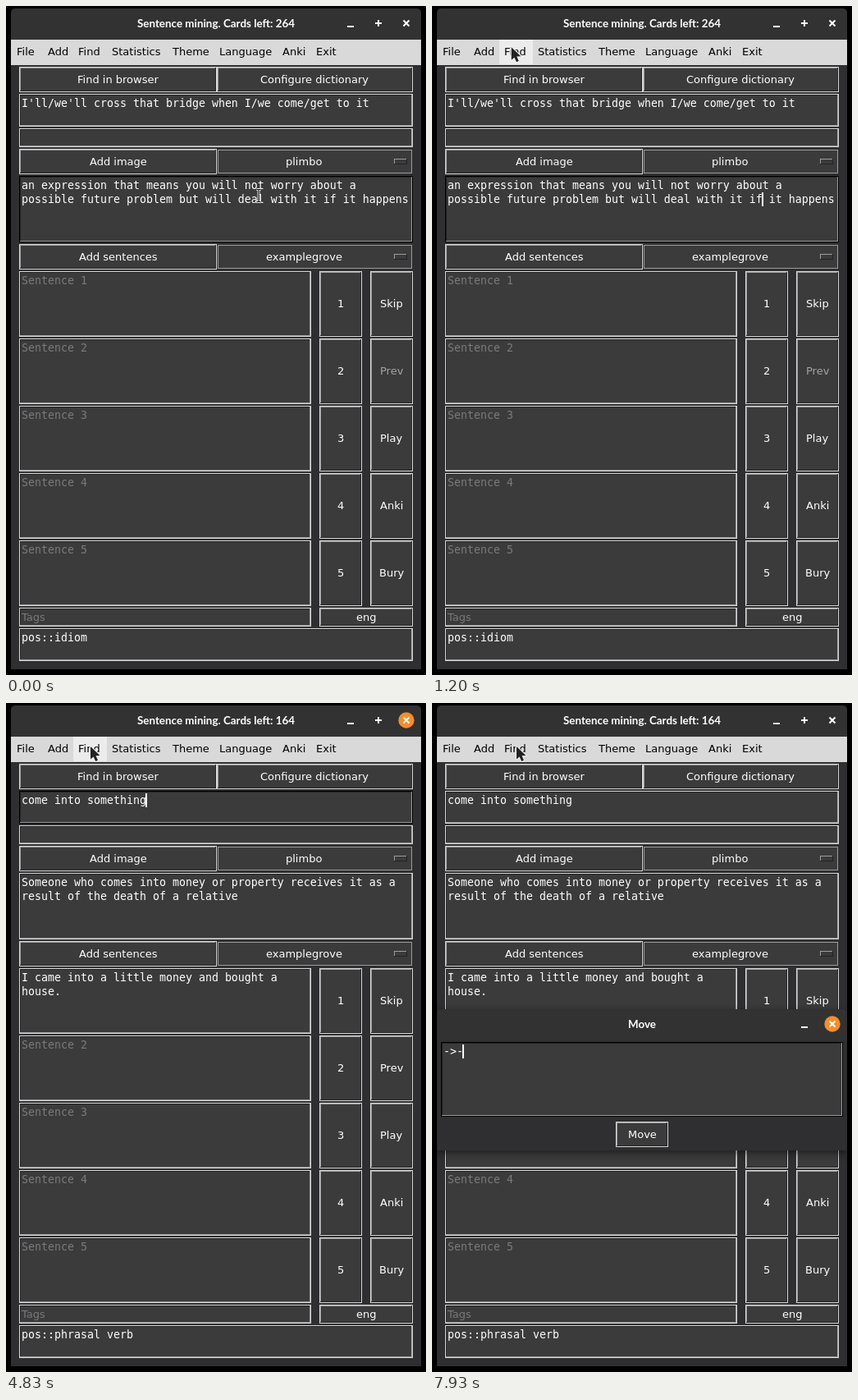
These frames come from a looping animation (512 px wide and 815 px high, 8000 ms). An HTML page with a canvas:

```html
<!DOCTYPE html>
<html lang="en">
<head>
<meta charset="utf-8">
<title>Sentence mining</title>
<style>
  html, body { margin: 0; width: 100%; height: 100%; overflow: hidden; background: #000; }
  canvas { display: block; }
</style>
</head>
<body>
<canvas id="stage" width="512" height="815"></canvas>
<script>
const ctx = document.getElementById('stage').getContext('2d');
const LOOP = 8000;
const SANS = '13px "DejaVu Sans", sans-serif';
const MONO = '13.29px "DejaVu Sans Mono", monospace';
const TITLE = 'bold 13.4px Lato, sans-serif';
const COL = {
  bar: '#323232', body: '#2f2f31', face: '#3b3b3b', edge: '#d9d9d9',
  light: '#9d9d9d', dark: '#232323', hint: '#7a7a7a', off: '#a3a3a3',
  menu: '#d9d9d9', hover: '#ececec', close: '#f78d2a', text: '#ffffff'
};
const MENU = [['File', 13], ['Add', 51], ['Find', 88], ['Statistics', 129],
  ['Theme', 203], ['Language', 260], ['Anki', 337], ['Exit', 378], ['', 418]];

// Times in ms at which the small state changes happen
const OPEN_1 = 1410, CLOSE_1 = 3970, OPEN_2 = 5870;
const TYPED = [[0, ''], [2130, '-'], [2470, '->'], [3050, '->1'], [3130, '->10'],
  [3300, '->100'], [CLOSE_1, ''], [6970, '-'], [7400, '->'], [7930, '->-']];
const CARET_ON = [[970, 1370], [1470, 2070], [2370, 2970], [3270, 3870], [3970, 4530],
  [4830, 5430], [5730, 5830], [6130, 6730], [7030, 7630], [7930, 8000]];
const PATH = [[0, 308, 231], [170, 308, 231], [560, 110, 47], [680, 97, 39], [800, 90, 48],
  [970, 90, 48], [1000, 93, 49], [1170, 94, 49], [1270, 103, 53], [LOOP, 103, 53]];

const CARDS = [
  { left: 264, phrase: "I'll/we'll cross that bridge when I/we come/get to it",
    meaning: ['an expression that means you will not worry about a',
      'possible future problem but will deal with it if it happens'],
    example: null, pos: 'pos::idiom' },
  { left: 164, phrase: 'come into something',
    meaning: ['Someone who comes into money or property receives it as a',
      'result of the death of a relative'],
    example: ['I came into a little money and bought a', 'house.'],
    pos: 'pos::phrasal verb' }
];

function rect(x0, y0, x1, y1, color) {
  ctx.fillStyle = color;
  ctx.fillRect(x0, y0, x1 - x0, y1 - y0);
}

function label(str, x, y, font, color) {
  ctx.font = font;
  ctx.fillStyle = color;
  ctx.fillText(str, x, y);
}

function centred(str, cx, y, font, color) {
  ctx.font = font;
  label(str, Math.round(cx - ctx.measureText(str).width / 2), y, font, color);
}

// Outer ring plus a one pixel bevel
function frame(x0, y0, x1, y1, ring, topLeft, bottomRight) {
  rect(x0, y0, x1, y1, ring);
  rect(x0 + 1, y0 + 1, x1 - 1, y1 - 1, bottomRight);
  rect(x0 + 1, y0 + 1, x1 - 2, y1 - 2, topLeft);
  rect(x0 + 2, y0 + 2, x1 - 2, y1 - 2, COL.face);
}

function button(str, x0, y0, x1, y1, color = COL.text) {
  frame(x0, y0, x1, y1, COL.edge, COL.light, COL.dark);
  centred(str, (x0 + x1) / 2, Math.floor((y0 + y1 - 17) / 2) + 13, SANS, color);
}

function field(lines, x0, y0, x1, y1, { focus = false, color = COL.text, font = MONO } = {}) {
  frame(x0, y0, x1, y1, focus ? '#000' : COL.edge, COL.dark, focus ? COL.light : COL.light);
  lines.forEach((s, i) => label(s, x0 + 3, y0 + 16 + 17 * i, font, color));
}

function select(str, y) {
  rect(258, y + 1, 495, y + 30, COL.light);
  rect(259, y + 2, 494, y + 29, COL.face);
  centred(str, 363, y + 20, SANS, COL.text);
  rect(473, y + 12, 489, y + 19, COL.dark);
  rect(473, y + 12, 488, y + 18, COL.light);
  rect(474, y + 13, 488, y + 18, COL.face);
}

function caret(x, y) {
  rect(x - 1, y, x + 1, y + 17, COL.text);
}

function titleBar(str, y, active, hasMax) {
  ctx.fillStyle = COL.bar;
  ctx.beginPath();
  ctx.roundRect(6, y, 500, 38, [5, 5, 0, 0]);
  ctx.fill();
  const mid = y + 18;
  centred(str, 256, mid + 5, TITLE, COL.text);
  const minX = hasMax ? 416 : 450;
  rect(minX, mid + 3, minX + 8, mid + 5, COL.text);
  if (hasMax) {
    rect(450, mid - 1, 458, mid + 1, COL.text);
    rect(453, mid - 4, 455, mid + 4, COL.text);
  }
  if (active) {
    ctx.fillStyle = COL.close;
    ctx.beginPath();
    ctx.arc(488, mid, 9.7, 0, Math.PI * 2);
    ctx.fill();
  }
  ctx.strokeStyle = COL.text;
  ctx.lineWidth = 2;
  ctx.beginPath();
  ctx.moveTo(484.5, mid - 3.5); ctx.lineTo(491.5, mid + 3.5);
  ctx.moveTo(491.5, mid - 3.5); ctx.lineTo(484.5, mid + 3.5);
  ctx.stroke();
}

function menuBar(hoverX) {
  rect(6, 41, 506, 72, COL.menu);
  for (let i = 0; i < MENU.length - 1; i++) {
    const [name, x] = MENU[i], from = x - 6, to = MENU[i + 1][1] - 6;
    if (hoverX >= from && hoverX < to) rect(from, 41, to, 71, COL.hover);
    label(name, x, 60, SANS, '#000');
  }
}

function mainWindow(card, s) {
  rect(6, 30, 506, 808, COL.body);
  titleBar('Sentence mining. Cards left: ' + card.left, 3, s.active, true);
  menuBar(s.hoverX);
  button('Find in browser', 16, 74, 257, 105);
  button('Configure dictionary', 257, 74, 496, 105);
  field([card.phrase], 16, 107, 496, 147, { focus: s.focus === 'phrase' });
  field([], 16, 149, 496, 172);
  button('Add image', 16, 174, 257, 205);
  select('plimbo', 174);
  field(card.meaning, 16, 207, 496, 288, { focus: s.focus === 'meaning' });
  button('Add sentences', 16, 290, 257, 321);
  select('examplegrove', 290);
  ['Skip', 'Prev', 'Play', 'Anki', 'Bury'].forEach((name, i) => {
    const y = 323 + 82 * i, filled = i === 0 && card.example;
    field(filled || ['Sentence ' + (i + 1)], 16, y, 372, y + 80,
      { color: filled ? COL.text : COL.hint });
    button(String(i + 1), 382, y, 434, y + 80);
    button(name, 444, y, 496, y + 80, i === 1 && !card.example ? COL.off : COL.text);
  });
  field(['Tags'], 16, 733, 372, 756, { color: COL.hint, font: SANS });
  button('eng', 382, 733, 496, 756);
  field([card.pos], 16, 758, 496, 798);
}

function dialog(str, showCaret) {
  ctx.save();
  ctx.shadowColor = 'rgba(0,0,0,0.5)';
  ctx.shadowBlur = 10;
  ctx.shadowOffsetY = 3;
  ctx.fillStyle = COL.body;
  ctx.beginPath();
  ctx.roundRect(6, 373, 500, 172, [5, 5, 0, 0]);
  ctx.fill();
  ctx.restore();
  titleBar('Move', 373, true, false);
  field([str], 11, 413, 501, 504, { focus: true });
  button('Move', 224, 510, 288, 541);
  if (showCaret) caret(14 + 8 * str.length, 416);
}

function arrow(x, y) {
  ctx.beginPath();
  [[0, 0], [0, 15.5], [3.6, 12.4], [6.3, 18], [9, 16.8], [6.5, 11.3], [11.5, 11]]
    .forEach(([dx, dy]) => ctx.lineTo(x + dx, y + dy));
  ctx.closePath();
  ctx.lineJoin = 'round';
  ctx.lineWidth = 2;
  ctx.strokeStyle = '#f2f2f2';
  ctx.stroke();
  ctx.fillStyle = '#222';
  ctx.fill();
}

function beam(x, y) {
  ctx.beginPath();
  ctx.moveTo(x - 2.5, y - 7.5); ctx.lineTo(x + 2.5, y - 7.5);
  ctx.moveTo(x, y - 7.5); ctx.lineTo(x, y + 7.5);
  ctx.moveTo(x - 2.5, y + 7.5); ctx.lineTo(x + 2.5, y + 7.5);
  for (const [w, c] of [[3, '#f2f2f2'], [1.2, '#111']]) {
    ctx.lineWidth = w;
    ctx.strokeStyle = c;
    ctx.stroke();
  }
}

function pointerAt(t) {
  let i = 1;
  while (i < PATH.length - 1 && t >= PATH[i][0]) i++;
  const [t0, x0, y0] = PATH[i - 1], [t1, x1, y1] = PATH[i];
  let k = (t - t0) / (t1 - t0);
  if (t0 === 170) k = k * k * (3 - 2 * k);
  return [x0 + (x1 - x0) * k, y0 + (y1 - y0) * k];
}

function focusAt(t) {
  if (t < 1370) return 'meaning';
  return t >= CLOSE_1 && t < 5830 ? 'phrase' : '';
}

function draw(t) {
  const [px, py] = pointerAt(t);
  const focus = focusAt(t);
  const showCaret = CARET_ON.some(([a, b]) => t >= a && t < b);
  const hovering = t < 1370 ? py >= 41 && py < 71 : t >= 4570 && t < 5830;
  rect(0, 0, 512, 815, '#000');
  mainWindow(CARDS[t < CLOSE_1 ? 0 : 1], {
    focus, active: focus === 'phrase', hoverX: hovering ? px : -1
  });
  if (showCaret && focus === 'meaning') caret(403, 227);
  if (showCaret && focus === 'phrase') caret(171, 110);
  if ((t >= OPEN_1 && t < CLOSE_1) || t >= OPEN_2) {
    dialog(TYPED.filter(e => e[0] <= t).pop()[1], showCaret);
  }
  const overText = (py >= 107 && py < 172) || (py >= 207 && py < 288);
  (overText ? beam : arrow)(px, py);
}

const start = performance.now();
function tick() {
  draw((performance.now() - start) % LOOP);
  requestAnimationFrame(tick);
}
tick();
</script>
</body>
</html>
```
